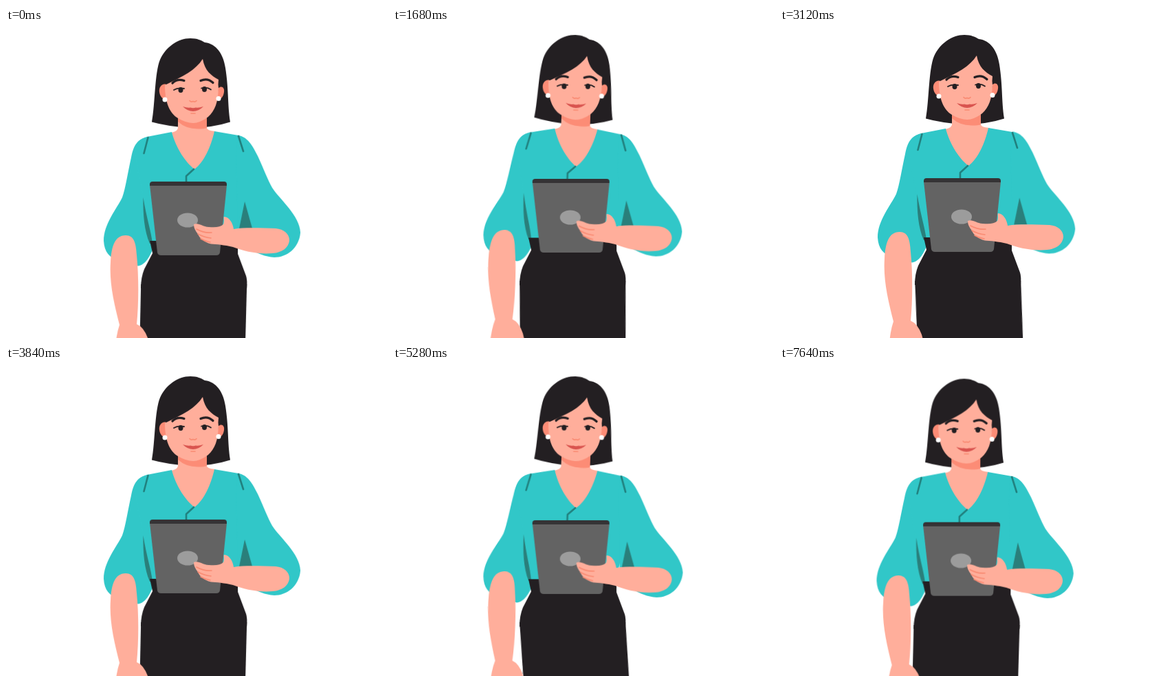
Recreate the animation shown at these times as an HTML page without scripts. Size 554 by 450 pixels, loop 7680 ms.

```html
<!DOCTYPE html>
<html lang="en">
<head>
<meta charset="utf-8">
<title>Woman walking with a tablet</title>
<style>
html, body { margin: 0; width: 100%; height: 100%; overflow: hidden; background: #fff; }
svg { display: block; width: 100%; height: 100%; }

.skin { fill: #ffae9b; }
.flush { fill: #fc8c76; }
.teal { fill: #31c7c8; }
.shade { fill: #2a7f7b; }
.dark { fill: #231f22; }
.line { fill: none; stroke-linecap: round; stroke-linejoin: round; }
.fold { stroke: #20807e; stroke-width: 2.6; }
.crease { stroke: #f98a72; stroke-width: 1.6; }
.brow { stroke: #231f22; stroke-width: 3.2; }
.lash { stroke: #231f22; stroke-width: 1.8; }

.bob, .sway, .elbow, .leg {
  animation: 480ms cubic-bezier(.37, 0, .63, 1) infinite alternate;
}
.bob { animation-name: bob; animation-duration: 240ms; animation-delay: -336ms; }
.sway { animation-name: sway; animation-delay: -840ms; }
.elbow { animation-name: elbow; animation-delay: -816ms; }
.leg { animation-name: leg; animation-delay: -537ms; transform-origin: 0 372px; }

/* Each part sways by its own shift and turn */
.sway { --x: 0; --y: 0; --r: 0; }
.torso { --r: 2.2; transform-origin: 240px 2px; }
.cuff { --r: 2; transform-origin: 240px 5px; }
.head { --r: 1.8; transform-origin: 262px -75px; }
.hips { --x: -12; --y: .5; }
.tablet { --x: -6.3; --y: 1; }
.forearm { --x: -6.3; --y: .5; --r: .6; transform-origin: 275px 285px; }

@keyframes bob {
  from { transform: translateY(-10.8px); }
  to { transform: translateY(5.7px); }
}
@keyframes sway {
  from {
    transform: translate(calc(var(--x) * -.207px), calc(var(--y) * -.207px))
      rotate(calc(var(--r) * -.207deg));
  }
  to {
    transform: translate(calc(var(--x) * 1.207px), calc(var(--y) * 1.207px))
      rotate(calc(var(--r) * 1.207deg));
  }
}
@keyframes elbow {
  from { transform: translate(2.3px, -1px); }
  to { transform: translate(-8.8px, 4px); }
}
@keyframes leg {
  from { transform: skewX(5.27deg); }
  to { transform: skewX(-.19deg); }
}
</style>
</head>
<body>
<svg viewBox="0 0 554 450">
<g class="bob">

  <g class="sway head">
    <path class="dark" d="M212 136.500C217 110 216 65 224 46C232 28 250 15 268 15C278 15 284 18 289 21C306 23 316 38 319 58C324 90 322 110 326 136.500Q300 145 268 145Q235 143 212 136.500Z"/>
  </g>

  <g class="sway cuff">
    <path class="teal" d="M207 158C192 161 186 168 182 188C177 210 174 232 169 246C160 264 142 285 142 309C143 325 150 334 165 338L192 345.500Q204 344 213 322L204 250Z"/>
  </g>

  <g class="sway torso">
    <path class="skin" d="M250 128V145Q250 150 240 152L236 160L274 215L310 160L304 150Q292 149 292 145V128Z"/>
    <path class="flush" d="M250 128V136Q262 147 280 146.500Q288 146.500 292 145V128Z"/>
    <path class="teal" d="M241 151L205 158C195 161 190 165 186 178L199 247L210 313H320L339 292L347 252L362 185Q355 160 338 156L303 150C298 172 288 195 274 205C262 196 247 175 241 151Z"/>
    <path class="shade" d="M199.500 246C204 275 211 295 213 313H209C201 295 199 270 199.500 246Z"/>
  </g>

  <g class="elbow">
    <path class="teal" d="M337 156C351 158 358 170 366 186C374 203 381 222 387 232C398 249 427 272 428 297C426 320 408 333 390 333C376 332 366 327 356 322L336 291V252L334 185Z"/>
    <path class="shade" d="M347 252L358 291H339Z"/>
  </g>

  <g class="sway torso line fold">
    <path d="M206.500 159L200.500 182M338 157L345 179M273 205L262 215V226"/>
  </g>

  <g class="sway hips dark">
    <path d="M209 309H330L337 319V328L349 360Q351 366 350 378H196Q196 362 201 350L213 327Z"/>
    <path class="leg" d="M196.200 372L194 475H347.500L350.200 372Z"/>
  </g>

  <g class="sway tablet">
    <path fill="#636363" d="M209 228H321L311 326Q310 330 306 330H225Q221 330 220 326Z"/>
    <path fill="#353335" d="M209 229V227Q209 223 213 223H317Q321 223 321 227V229Z"/>
    <ellipse fill="#9c9c9c" cx="264" cy="279" rx="15" ry="10.500"/>
  </g>

  <g class="sway forearm">
    <path class="skin" d="M273 285C280 282 284 288 295 289C305 290 312 289 316 285C318 280 316 276 317 274C324 274 330 283 331 292C350 289 375 291 392 291C404 292 412 299 412 308C411 320 400 326 388 327C368 329 345 324 330 318C318 315 305 314 298 313.500C288 311 281 305 279 299Q273 292 273 285Z"/>
    <path class="line crease" d="M277 292Q288 298 299 297M279 299Q288 304 298 305M283 306Q290 310 297 311"/>
  </g>

  <g class="sway torso">
    <path class="skin" d="M174 301C186 301 189 312 190 330C193 360 193 400 190 430Q200 434 206 450L212 472H158Q160 445 165 431C157 400 150 370 152 340C153 318 158 301 174 301Z"/>
  </g>

  <g class="sway head">
    <path class="flush" d="M233 82C227 80 222 86 223 93C224 100 228 104 234 104ZM309 87C314 83 318 87 317 93C316 100 313 104 306 104Z"/>
    <path class="skin" d="M231 83C231 108 238 124 250 131Q262 138 272 138Q282 138 294 129C304 120 308 108 309 88Q308 82 309 75C298 69 289 62 286 45C276 61 258 70 231 83Z"/>
    <path class="line brow" d="M242 80Q249 73 259 76.500M283 76.500Q293 72 301 79.500"/>
    <g class="dark">
      <ellipse cx="254" cy="90" rx="3.500" ry="4"/>
      <ellipse cx="288.500" cy="89" rx="3.500" ry="4"/>
    </g>
    <path class="line lash" d="M244 90Q250 86 259 88M284 87.500Q292 85 298 89.500"/>
    <path class="line crease" d="M267 105.500Q269 108 272 106.500Q275 108 277 105.500"/>
    <path fill="#d9544f" d="M257 114Q264 116.500 268 115.500Q272 117 276 115.500Q280 116.500 287 114Q280 121 272 121Q264 121 257 114Z"/>
    <path class="line crease" d="M269 124H275"/>
    <g fill="#fff">
      <circle cx="231" cy="104" r="3.500"/>
      <circle cx="309" cy="102.500" r="3.500"/>
    </g>
  </g>

</g>
</svg>
</body>
</html>
```
